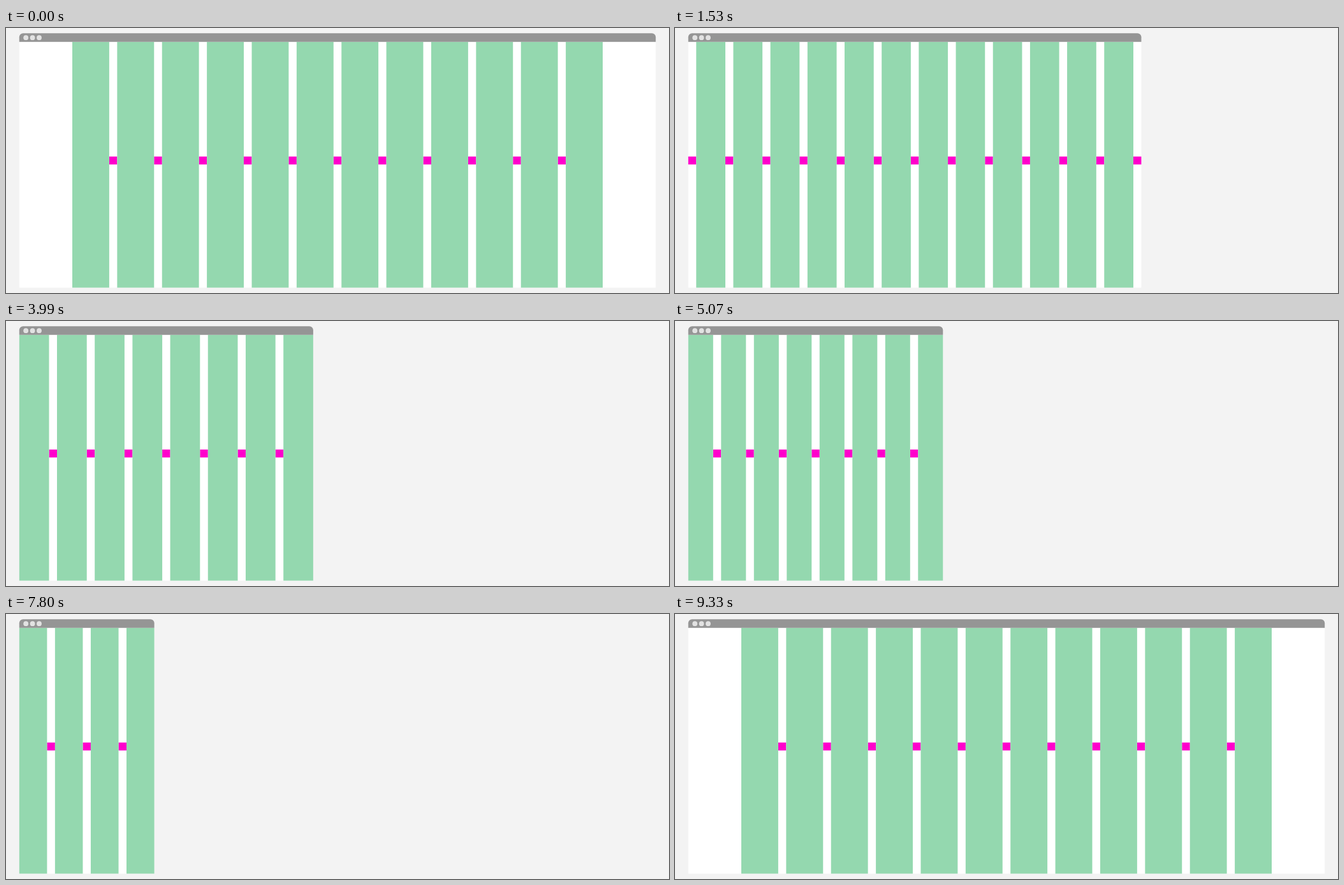
Recreate the animation shown at these times as an HTML page with a canvas. Size 1040 by 416 pixels, loop 9.36 s.

```html
<!DOCTYPE html>
<html lang="en">
<head>
<meta charset="utf-8">
<title>Responsive column grid</title>
<style>
  html, body { margin: 0; height: 100%; overflow: hidden; background: #f3f3f3; }
  canvas { display: block; width: 1040px; height: 416px; }
</style>
</head>
<body>
<canvas id="stage" width="1040" height="416"></canvas>
<script>
const ctx = document.getElementById('stage').getContext('2d');
const LOOP = 9360, STEP = 30, BEAT = 1440;
const SCALE = 998.4 / 1440; // stage pixels per browser pixel
const LEFT = 20.8, TOP = 8.3, BAR = 13.5, BOTTOM = 407.6;
const GUTTER = 18, MAX_GRID = 1200;

// Browser widths the window rests at while shrinking
const stops = [1440, 1025, 768, 577, 311, 240];
const GROW = 7555, HALF = 8493, FULL = 9330;

const ease = p => p < 0.5 ? 2 * p * p : 1 - 2 * (1 - p) * (1 - p);

function tween(t, start, end, from, to) {
  const p = Math.max(0, Math.min(1, (t - start) / (end - start)));
  return from + (to - from) * ease(p);
}

function widthAt(t) {
  if (t >= HALF) return tween(t, HALF, FULL, 720, 1440);
  if (t >= GROW) return tween(t, GROW, HALF, 240, 720);
  // One shrink per beat, then a rest
  const i = Math.floor(t / BEAT);
  if (i >= stops.length - 1) return stops.at(-1);
  const start = i * BEAT + BEAT / 2;
  const span = 720 + STEP * ((i + 3) % 4);
  const next = tween(t, start, start + span, stops[i], stops[i + 1]);
  if (i === 0) return next;
  // A long shrink may run slightly into the following beat
  const prevStart = start - BEAT;
  const prevSpan = 720 + STEP * ((i + 2) % 4);
  return t < start
    ? tween(t, prevStart, prevStart + prevSpan, stops[i - 1], stops[i])
    : next;
}

function layout(w) {
  if (w < 311) return { count: 4, margin: 0 };
  if (w < 768) return { count: 8, margin: 0 };
  return { count: 12, margin: Math.max(GUTTER, (w - MAX_GRID) / 2) };
}

function rect(color, x, y, w, h) {
  ctx.fillStyle = color;
  ctx.fillRect(x, y, w, h);
}

function drawGrid(w) {
  const { count, margin } = layout(w);
  const top = TOP + BAR, height = BOTTOM - top;
  const gutter = GUTTER * SCALE;
  const pitch = (w - 2 * margin + GUTTER) / count * SCALE;
  const x = LEFT + margin * SCALE;
  const outer = margin === GUTTER ? 0 : 1;

  rect('#fff', LEFT, top, w * SCALE, height);
  for (let i = outer; i <= count - outer; i++) {
    rect('#ff00cc', x + i * pitch - gutter, 208 - gutter / 2, gutter, gutter);
  }
  for (let i = 0; i < count; i++) {
    rect('#94d8af', x + i * pitch, top, pitch - gutter, height);
  }
}

function drawBar(w) {
  ctx.fillStyle = '#959595';
  ctx.beginPath();
  ctx.roundRect(LEFT, TOP, w * SCALE, BAR, [6, 6, 0, 0]);
  ctx.fill();
  ctx.fillStyle = '#e2e2e2';
  for (let i = 0; i < 3; i++) {
    ctx.beginPath();
    ctx.arc(31.2 + i * 10.4, 15.2, 3.9, 0, Math.PI * 2);
    ctx.fill();
  }
}

let origin;
function frame(now) {
  origin ??= now;
  const t = Math.floor(((now - origin) % LOOP) / STEP) * STEP;
  const w = widthAt(t);
  rect('#f3f3f3', 0, 0, 1040, 416);
  drawGrid(w);
  drawBar(w);
  requestAnimationFrame(frame);
}
requestAnimationFrame(frame);
</script>
</body>
</html>
```
